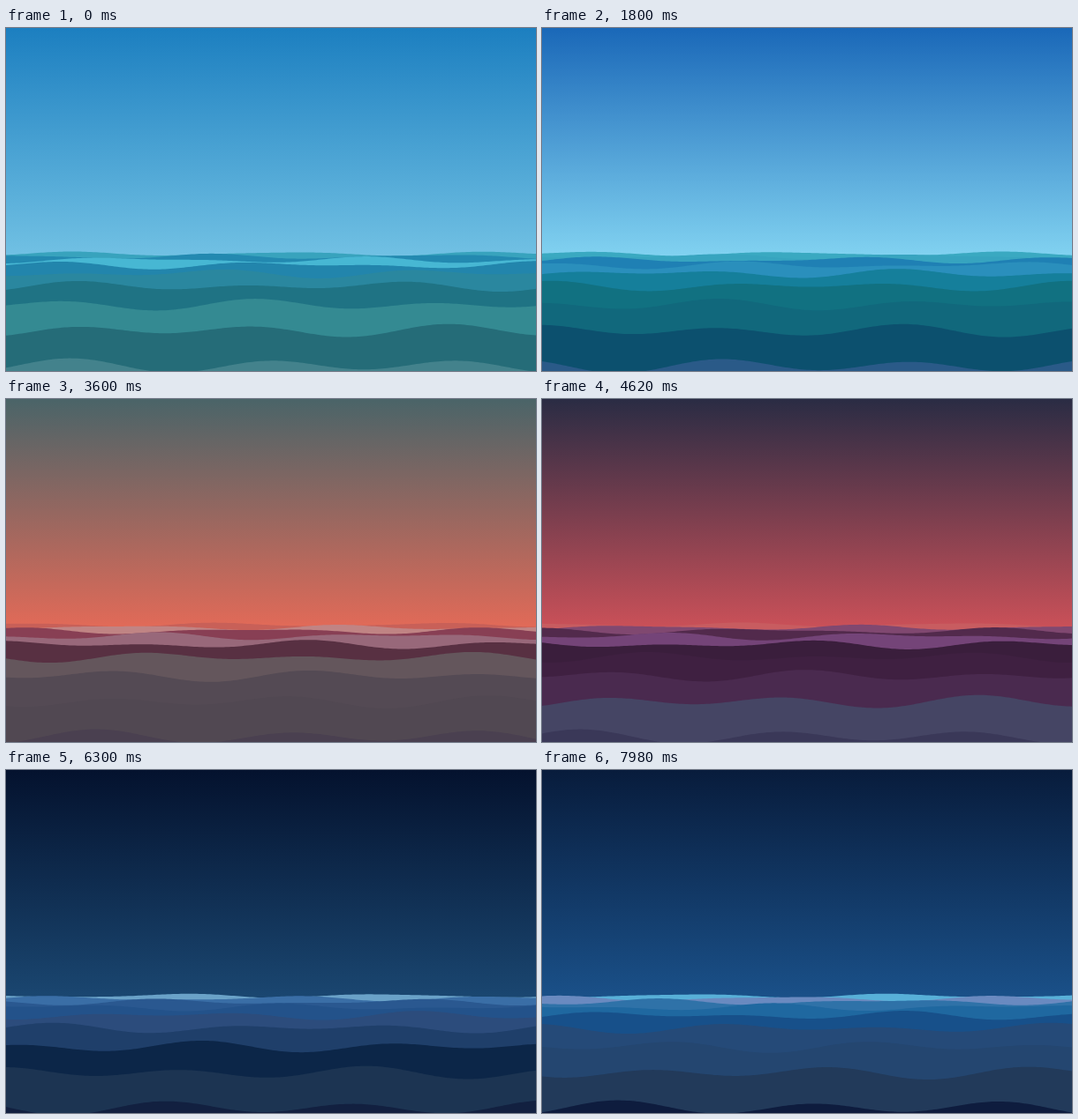
Animation, 600 px wide and 389 px high, one loop 8000 ms. Source, as an HTML page with a canvas:

```html
<!DOCTYPE html>
<html lang="en">
<head>
<meta charset="utf-8">
<title>Sea from day to night</title>
<style>
  html, body { margin: 0; width: 100%; height: 100%; overflow: hidden; background: #04122e; }
  canvas { display: block; width: 100vw; height: 100vh; }
</style>
</head>
<body>
<canvas id="sea" width="600" height="389"></canvas>
<script>
const ctx = document.getElementById('sea').getContext('2d');
const WIDTH = 600, HEIGHT = 389, HORIZON = 256, WAVES = 9, LOOP = 8000, STEP = 60;

// Time of day: sky top and bottom, then the waves from far to near.
const moods = [
  { at: 0, colors: '#1c7fc0 #70c0e3 #38a3bd #2389b0 #47b7d3 #2285ac #2a879f #1f7384 #348a92 #256c78 #43828c' },
  { at: 1800, colors: '#1a68b8 #80d1f0 #3aa9c1 #37a4bf #1f80b4 #2a8fbc #157f9b #117181 #11687c #0c506e #2a5a88' },
  { at: 2760, colors: '#4a90a0 #de976f #936f66 #b8a68e #98706a #9ea48f #4d625e #5c8a84 #466d6d #405f62 #4b6468' },
  { at: 3600, colors: '#4a6468 #e06a58 #c86058 #c08484 #883f54 #98687a #583042 #64565c #544a54 #514852 #4a4050' },
  { at: 4620, colors: '#2a2c44 #c85058 #c85c60 #804870 #522a4c #744478 #3a1e3c #3f2041 #4a2a4f #454564 #3a3858' },
  { at: 6300, colors: '#04122e #1a4670 #6aa2c8 #3a6ea6 #2a5890 #23528a #2c4c7c #1f3f6a #0c2648 #1c3452 #122040' },
  { at: 7980, colors: '#081c3c #1a5088 #58b0d8 #6a8ac0 #2f72a8 #1f68a0 #17508a #254a78 #244670 #223a5a #0e1c3e' }
].map(({ at, colors }) => ({ at, colors: colors.split(' ').map(parseHex) }));

function parseHex(hex) {
  return [1, 3, 5].map(i => parseInt(hex.slice(i, i + 2), 16));
}

function colorsAt(time) {
  const next = Math.max(1, moods.findIndex(mood => mood.at >= time));
  const from = moods[next - 1], to = moods[next];
  const u = (time - from.at) / (to.at - from.at);
  return from.colors.map((color, i) =>
    `rgb(${color.map((v, c) => Math.round(v + (to.colors[i][c] - v) * u))})`);
}

// Nearer waves lie lower, rise higher, stretch longer and drift left faster.
function waveHeight(index, time) {
  const depth = index / (WAVES - 1);
  const base = HORIZON + 24 * depth + 103 * depth ** 3.3;
  const amplitude = 2.5 + 6 * depth;
  const length = 150 + 70 * depth;
  const shift = 54 * depth * time / 1000 - 75;
  const chop = 0.75 - 0.5 * depth;
  return x => {
    const angle = 2 * Math.PI * (x + shift) / length;
    const swell = (1 - chop) * Math.cos(angle);
    const ripple = chop * Math.cos(0.63 * angle + 2.4 * index + time / 2000);
    return base - amplitude * (swell + ripple);
  };
}

function drawWave(height, color) {
  ctx.beginPath();
  ctx.moveTo(0, HEIGHT);
  for (let x = 0; x <= WIDTH; x += 3) ctx.lineTo(x, height(x));
  ctx.lineTo(WIDTH, HEIGHT);
  ctx.fillStyle = color;
  ctx.fill();
}

function draw(time) {
  const [skyTop, skyBottom, ...waveColors] = colorsAt(time);
  const sky = ctx.createLinearGradient(0, 0, 0, HORIZON);
  sky.addColorStop(0, skyTop);
  sky.addColorStop(1, skyBottom);
  ctx.fillStyle = sky;
  ctx.fillRect(0, 0, WIDTH, HEIGHT);
  waveColors.forEach((color, i) => drawWave(waveHeight(i, time), color));
}

const start = performance.now();
function frame() {
  const time = (performance.now() - start) % LOOP;
  draw(Math.floor(time / STEP) * STEP);
  requestAnimationFrame(frame);
}
frame();
</script>
</body>
</html>
```
